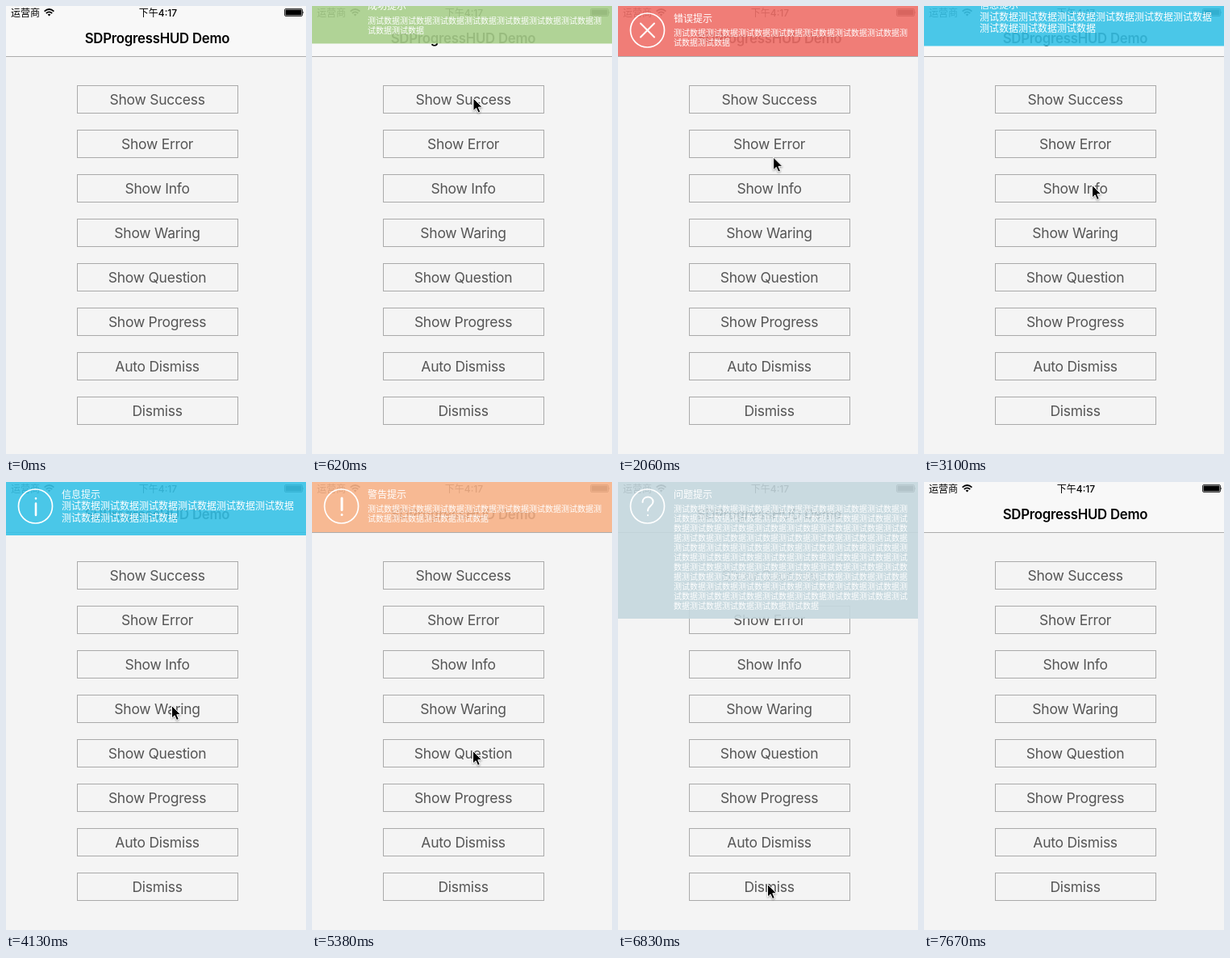
Recreate the animation shown at these times as an HTML page. Size 372 by 554 pixels, loop 8.15 s.

```html
<!DOCTYPE html>
<html lang="zh-CN">
<head>
<meta charset="utf-8">
<title>SDProgressHUD Demo</title>
<style>
  html, body { margin: 0; width: 100%; height: 100%; overflow: hidden; background: #f4f4f4; }
  svg { display: block; width: 100%; height: 100%; }
  text { font-family: Inter, "Noto Sans CJK SC", "Noto Sans CJK", sans-serif; white-space: pre; }
  .mid { text-anchor: middle; }
  .status { font-size: 12px; font-weight: 500; }
  .title { font-size: 16.8px; font-weight: 600; letter-spacing: -.25px; }
  .label { font-size: 17.5px; letter-spacing: -.25px; fill: #555; }
  .icon { fill: none; stroke: #fff; stroke-linecap: round; stroke-linejoin: round; }
  #hud text { fill: #fff; font-family: "Noto Sans CJK SC", "Noto Sans CJK", sans-serif; }
  #cursor { filter: drop-shadow(0 1px 1px rgba(0, 0, 0, .35)); }
</style>
</head>
<body>
<svg viewBox="0 0 372 554">
  <rect width="372" height="554" fill="#f4f4f4"/>
  <rect width="372" height="62" fill="#f8f8f8"/>
  <rect y="62" width="372" height="1" fill="#adadad"/>
  <text class="status" x="6" y="12.6">运营商</text>
  <g fill="none" stroke="#000" stroke-width="1.8">
    <path d="M47.6 6.6Q53.5 1.4 59.4 6.6M49.8 9Q53.5 5.7 57.2 9"/>
    <path d="M53.5 12.6L51.6 10.5Q53.5 9 55.4 10.5Z" fill="#000" stroke="none"/>
  </g>
  <text class="status mid" x="188.5" y="12.6">下午4:17</text>
  <rect x="345.5" y="3.5" width="22" height="9" rx="1.5" fill="none" stroke="#000" stroke-width=".8"/>
  <rect x="346.5" y="4.5" width="20" height="7" rx=".6"/>
  <path d="M368.4 6.2Q370 8 368.4 9.8Z"/>
  <text class="title mid" x="187.5" y="46">SDProgressHUD Demo</text>
  <g id="buttons"></g>
  <g id="hud"></g>
  <path id="cursor" d="M0 0V15.6L3.6 12.3L6.1 18L8.8 16.8L6.3 11.2H11.2Z" stroke="#fff" stroke-width="1"/>
</svg>
<script>
const LOOP = 8150, STEP = 207, LEAD = 18;
const NS = 'http://www.w3.org/2000/svg';
const $ = id => document.getElementById(id);

function add(parent, tag, attrs, text) {
  const el = document.createElementNS(NS, tag);
  for (const key in attrs) el.setAttribute(key, attrs[key]);
  if (text) el.textContent = text;
  return parent.appendChild(el);
}

const clamp = v => Math.max(0, Math.min(1, v));
const easeOut = v => 1 - (1 - v) ** 2;
const smooth = v => v * v * (3 - 2 * v);

['Success', 'Error', 'Info', 'Waring', 'Question', 'Progress'].map(s => 'Show ' + s)
  .concat('Auto Dismiss', 'Dismiss')
  .forEach((label, i) => {
    const y = 98 + i * 55;
    add($('buttons'), 'rect', { x: 88.5, y: y + .5, width: 199, height: 34, fill: 'none', stroke: '#aaa' });
    add($('buttons'), 'text', { class: 'label mid', x: 187.6, y: y + 24 }, label);
  });

const panels = [
  { at: 3, title: '成功提示', color: '#a9d08c', height: 62, size: 10, repeat: 9,
    icon: 'M24.5 29.5L34 39L49.5 22.5', weight: 2 },
  { at: 8, title: '错误提示', color: '#f0706a', height: 62, size: 10, repeat: 9,
    icon: 'M28 21.5L45 38.5M45 21.5L28 38.5', weight: 2 },
  { at: 15, title: '信息提示', color: '#38c3e7', height: 66, size: 12, repeat: 9,
    icon: 'M37 20.2V20.4M37 26.5V41', weight: 2.6 },
  { at: 22, title: '警告提示', color: '#f8b389', height: 62, size: 10, repeat: 11,
    icon: 'M37 20V34.5M37 40.4V40.6', weight: 3 },
  { at: 28, title: '问题提示', color: '#c5d7de', height: 169, size: 10, repeat: 77,
    icon: 'M30.5 25C30.5 16.5 43.5 16.5 43.5 24.5C43.5 29.5 37 29.5 37 35.5M37 41V41.2', weight: 2 }
];
const DISMISS = 35;

for (const p of panels) {
  p.node = add($('hud'), 'g', {});
  add(p.node, 'rect', { width: 372, height: p.height, fill: p.color, opacity: .9 });
  add(p.node, 'text', { x: 69, y: 19.6, 'font-size': 12 }, p.title);
  const body = '测试数据'.repeat(p.repeat);
  const perLine = Math.floor(290 / p.size);
  const top = p.size === 12 ? 34.2 : 37.3;
  const leading = p.size === 12 ? 14.6 : 12;
  for (let i = 0; i * perLine < body.length; i++) {
    add(p.node, 'text', { x: 69, y: top + i * leading, 'font-size': p.size },
      body.slice(i * perLine, (i + 1) * perLine));
  }
  p.mark = add(p.node, 'g', { class: 'icon' });
  add(p.mark, 'circle', { cx: 36.5, cy: 30, r: 21, 'stroke-width': 1.7 });
  add(p.mark, 'path', { d: p.icon, 'stroke-width': p.weight });
}

// Pointer stops: step, x, y
const stops = [
  [1, 262, 150], [2, 200, 114], [4, 200, 114], [7, 187.5, 176.5], [9, 187.5, 176.5],
  [12, 207.5, 217.5], [13, 208.5, 221.5], [17, 208.5, 221.5], [20, 205.5, 276.5],
  [23, 205.5, 276.5], [26, 199.5, 332.5], [29, 199.5, 332.5], [33, 185.5, 497.5],
  [35, 185.5, 497.5], [36.9, 300, 440]
];

function pointer(k) {
  const i = stops.findIndex(s => s[0] > k);
  if (i < 1) return null;
  const [k0, x0, y0] = stops[i - 1], [k1, x1, y1] = stops[i];
  const u = smooth((k - k0) / (k1 - k0));
  return [x0 + (x1 - x0) * u, y0 + (y1 - y0) * u];
}

function render(ms) {
  const k = Math.floor((ms + LEAD) / STEP);
  panels.forEach((p, i) => {
    const last = i === panels.length - 1;
    const end = last ? DISMISS + 2 : panels[i + 1].at;
    const shown = k >= p.at && k < end;
    p.node.setAttribute('visibility', shown ? 'visible' : 'hidden');
    if (!shown) return;
    const enter = easeOut(clamp(k - p.at + .5));
    const leave = last ? smooth(clamp((k - DISMISS + .5) / 2)) : 0;
    p.node.setAttribute('transform', `translate(0 ${-p.height * (1 - enter + leave)})`);
    p.mark.setAttribute('opacity', clamp((k - p.at) / 2));
  });
  const at = pointer(k);
  $('cursor').setAttribute('visibility', at ? 'visible' : 'hidden');
  if (at) $('cursor').setAttribute('transform', `translate(${at[0]} ${at[1]})`);
}

const start = performance.now();
function tick() {
  render((performance.now() - start) % LOOP);
  requestAnimationFrame(tick);
}
tick();
</script>
</body>
</html>
```
